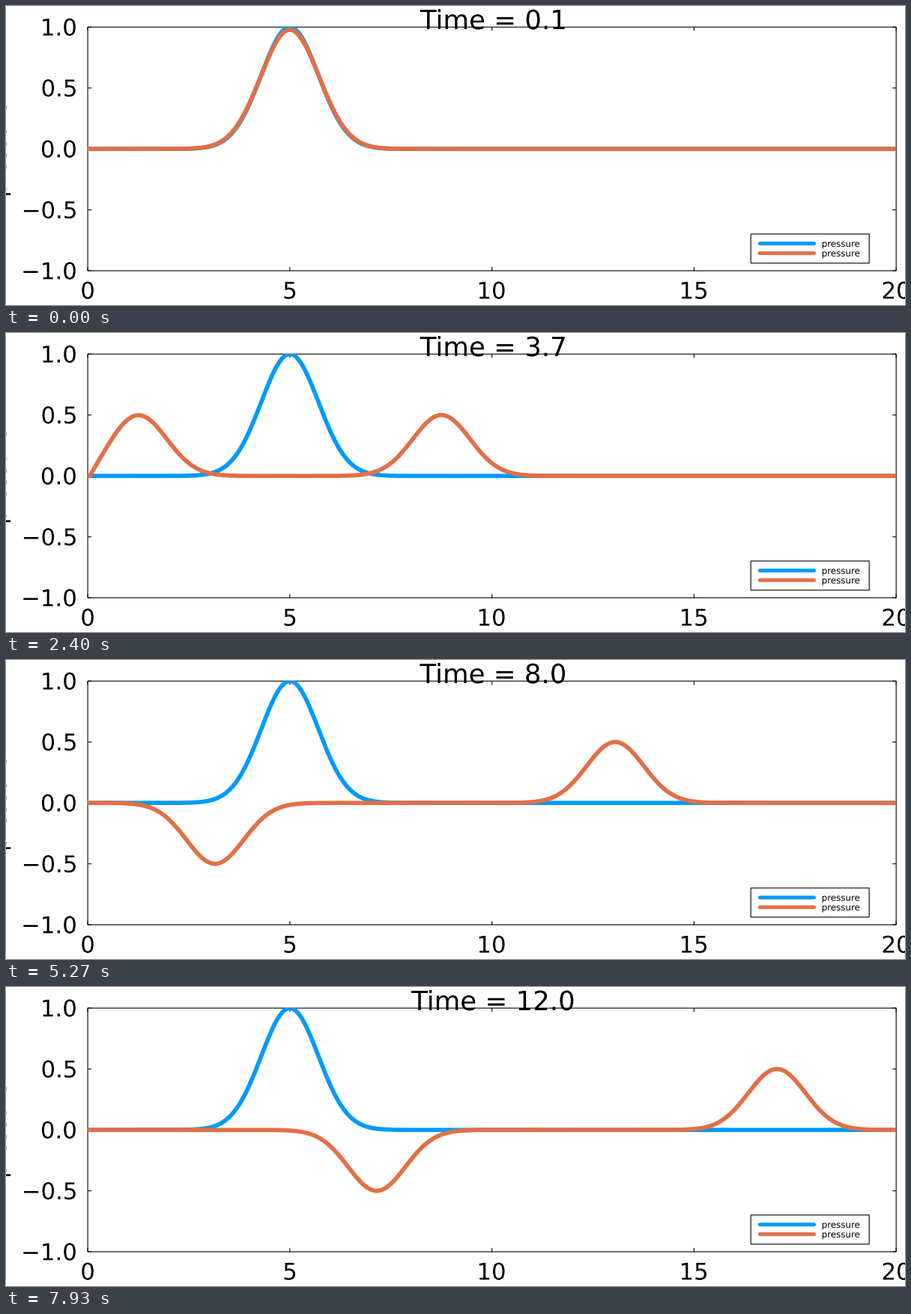
These frames come from a looping animation (1200 px wide and 400 px high, 8 s). A matplotlib script:

```python
import numpy as np
import matplotlib.pyplot as plt
from matplotlib.animation import FuncAnimation
from matplotlib.patches import PathPatch, Rectangle
from matplotlib.textpath import TextPath
from matplotlib.transforms import Affine2D

WIDTH, HEIGHT, DPI = 1200, 400, 100
LEFT, RIGHT, TOP, BOTTOM = 109.1, 1188.2, 28.2, 354.2
TICKS, TICK_MS = 400, 20  # 120 time steps spread over an 8 s loop
BLUE, ORANGE = "#009afa", "#e26f46"
TITLE_SIZE, TICK_SIZE, LABEL_SIZE, LEGEND_SIZE = 35.56, 30.8, 29.63, 11.85
CAP = 0.729  # capital height of the font, in em
DX = 0.05

plt.rcParams["font.family"] = "DejaVu Sans"

fig = plt.figure(figsize=(WIDTH / DPI, HEIGHT / DPI), dpi=DPI, facecolor="white")
ax = fig.add_axes([0, 0, 1, 1])
ax.set_xlim(0, WIDTH)
ax.set_ylim(HEIGHT, 0)
ax.axis("off")


def px(width):
    """Line width in pixels, as points."""
    return width * 72 / DPI


def to_x(v):
    return LEFT + (RIGHT - LEFT) * v / 20


def to_y(v):
    return (TOP + BOTTOM) / 2 - (BOTTOM - TOP) * v / 2


def text_path(text, size, x, y, align=0.5, turn=0):
    """Outline with its ink aligned on x (0 left, 1 right) and baseline on y."""
    path = TextPath((0, 0), text, size=size)
    box = path.get_extents()
    shift = -(box.x0 + align * box.width)
    move = Affine2D().translate(shift, 0).scale(1, -1).rotate_deg(-turn)
    return path.transformed(move.translate(x, y))


def add_text(*args, **kw):
    patch = PathPatch(text_path(*args, **kw), fc="black", lw=0, zorder=5)
    return ax.add_patch(patch)


def add_line(xs, ys, color="black", width=1.1, zorder=1, cap="butt"):
    line, = ax.plot(xs, ys, color=color, lw=px(width), zorder=zorder, snap=False,
                    solid_capstyle=cap, solid_joinstyle="round")
    return line


def add_box(x0, y0, x1, y1, zorder):
    return ax.add_patch(Rectangle((x0, y0), x1 - x0, y1 - y0, fc="white",
                                  ec="black", lw=px(1.1), zorder=zorder,
                                  snap=False))


def bell(x):
    return np.exp(-x ** 2)


def wave(t):
    """Two half pulses; the left one flips as it reflects from the wall."""
    s = t + DX
    p = 0.5 * (bell(x - 5 - s) + bell(x - 5 + s) - bell(x - (s - 5 + 2 * DX)))
    p[:2] = 0
    return p


def title_path(t):
    return text_path(f"Time = {t:.1f}", TITLE_SIZE, 649.2, 31)


# Frame, ticks and labels
add_box(LEFT, TOP, RIGHT, BOTTOM, 0)
for v in range(0, 21, 5):
    tx = to_x(v)
    add_line([tx, tx], [BOTTOM, BOTTOM - 5])
    add_line([tx, tx], [TOP, TOP + 5])
    add_text(str(v), TICK_SIZE, tx, 391.5)
for v in (-1, -0.5, 0, 0.5, 1):
    ty = to_y(v)
    add_line([LEFT, LEFT + 5], [ty, ty])
    add_line([RIGHT, RIGHT - 5], [ty, ty])
    label = f"{v:.1f}".replace("-", "\u2212")
    add_text(label, TICK_SIZE, 92.8, ty + CAP * TICK_SIZE / 2, align=1)
add_text("pressure", LABEL_SIZE, 0, to_y(0), turn=90)

# Curves
x = np.arange(400) * DX
clip = Rectangle((LEFT, TOP), RIGHT - LEFT, BOTTOM - TOP, transform=ax.transData)
start = add_line(to_x(x), to_y(bell(x - 5)), BLUE, 5.7, 2, "round")
pulse = add_line(to_x(x), to_y(wave(0.1)), ORANGE, 5.7, 3, "round")
for curve in (start, pulse):
    curve.set_clip_path(clip)

# Legend
add_box(994.2, 305, 1152.2, 344, 4)
for color, ly in ((BLUE, 317.8), (ORANGE, 330.7)):
    add_line([1006.3, 1078.6], [ly, ly], color, 5, 5, "round")
    add_text("pressure", LEGEND_SIZE, 1089.8, ly + CAP * LEGEND_SIZE / 2, align=0)

title = add_text("Time = 0.1", TITLE_SIZE, 649.2, 31)


def update(tick):
    # Three steps last ten ticks
    step = (3 * tick + 2) // 10
    t = (step + 1) / 10
    pulse.set_ydata(to_y(wave(t)))
    title.set_path(title_path(t))
    return pulse, title


anim = FuncAnimation(fig, update, frames=TICKS, interval=TICK_MS,
                     init_func=lambda: update(0), repeat=True, repeat_delay=0)
plt.show()
```
